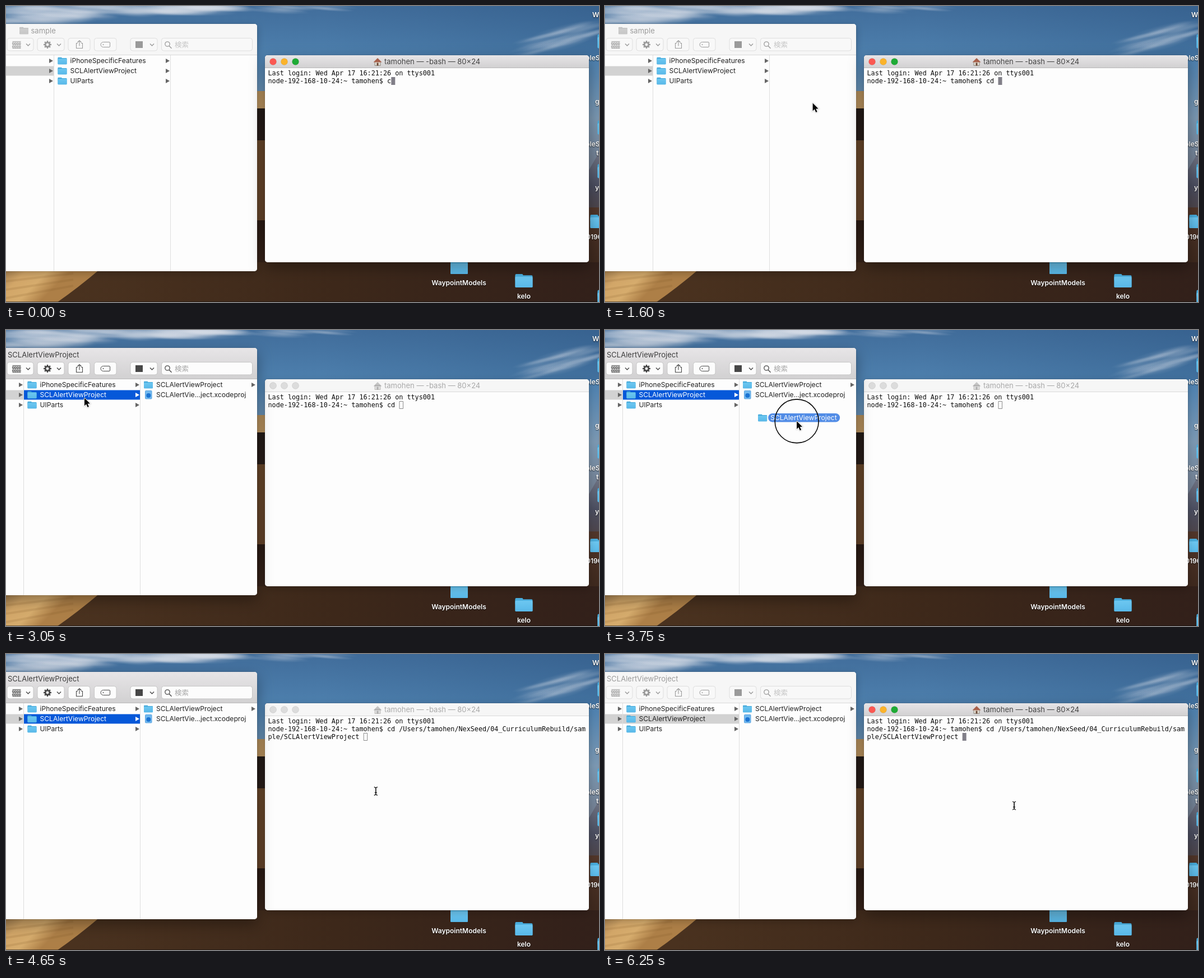
An HTML page with a canvas that plays this animation: 1058 by 529 pixels, repeating every 6.3 s.

```html
<!DOCTYPE html>
<html lang="ja">
<head>
<meta charset="utf-8">
<title>Drag a folder into the terminal</title>
<style>
html, body { margin: 0; width: 100%; height: 100%; overflow: hidden; background: #3a2519; }
canvas { display: block; width: 1058px; height: 529px; }
</style>
</head>
<body>
<canvas id="stage" width="1058" height="529"></canvas>
<script>
const W = 1058, H = 529, LOOP = 6300, STEP = 50;
const UI = 'Inter, "Noto Sans CJK JP", sans-serif';
const MONO = '"DejaVu Sans Mono", monospace';
const USER = 'tamohen';
const PROMPT = `node-192-168-10-24:~ ${USER}$ `;
const DROP = `/Users/${USER}/NexSeed/04_CurriculumRebuild/sample/SCLAlertViewProject `;
const PROJECT = 'SCLAlertViewProject';
const GREY = '#d2d2d2', BLUE = '#0658d9', INK = '#222';

const AT = { d: 150, space: 350, pointer: 1150, finder: 1700, open: 2300, slide: 2400, grab: 3300, drop: 4550, terminal: 5110 };
const PRESSES = [[AT.finder, AT.finder + 100], [AT.open, AT.open + 100], [AT.grab, AT.drop], [AT.terminal, AT.terminal + 100]];
const PATH = [
  { t: AT.pointer, x: 640, y: 250 },
  { t: 1950, x: 186, y: 121 },
  { t: 2700, x: 186, y: 121 },
  { t: 3330, x: 107, y: 122 },
  { t: 4100, x: 521, y: 194 },
  { t: 5000, x: 730, y: 271 },
];

const screen = document.getElementById('stage').getContext('2d');
let c = screen;

const clamp = v => Math.max(0, Math.min(1, v));
const ease = v => (v = clamp(v), v * v * (3 - 2 * v));
const mix = (a, b, k) => a + (b - a) * k;

function seeded(seed) {
  return () => (seed = seed * 16807 % 2147483647) / 2147483647;
}

function gradient(x0, y0, x1, y1, ...colors) {
  const g = c.createLinearGradient(x0, y0, x1, y1);
  colors.forEach((col, i) => g.addColorStop(i / (colors.length - 1), col));
  return g;
}

function text(s, x, y, size, color, font = UI, weight = 400) {
  c.font = `${weight} ${size}px ${font}`;
  c.fillStyle = color;
  c.fillText(s, x, y + size * 0.36);
}

function rect(x, y, w, h, fill) {
  c.fillStyle = fill;
  c.fillRect(x, y, w, h);
}

function paint(fill, stroke, width = 1) {
  if (fill) { c.fillStyle = fill; c.fill(); }
  if (stroke) { c.strokeStyle = stroke; c.lineWidth = width; c.stroke(); }
}

function box(x, y, w, h, r, fill, stroke) {
  c.beginPath();
  c.roundRect(x, y, w, h, r);
  paint(fill, stroke);
}

function disc(x, y, r, fill, stroke, width) {
  c.beginPath();
  c.arc(x, y, r, 0, Math.PI * 2);
  paint(fill, stroke, width);
}

function trace(pts) {
  c.beginPath();
  pts.forEach(([x, y]) => c.lineTo(x, y));
}

function poly(pts, fill) {
  trace(pts);
  paint(fill);
}

function line(pts, color, width) {
  trace(pts);
  paint(null, color, width);
}

function wisp(x, y, rx, ry, tilt, alpha) {
  c.save();
  c.translate(x, y);
  c.rotate(tilt);
  c.scale(rx, ry);
  const g = c.createRadialGradient(0, 0, 0, 0, 0, 1);
  g.addColorStop(0, `rgba(214,220,230,${alpha})`);
  g.addColorStop(1, 'rgba(214,220,230,0)');
  disc(0, 0, 1, g);
  c.restore();
}

function folder(x, y, w, grey) {
  const h = w * 0.78, l = x - w / 2, t = y - h / 2;
  const [back, top, base] = grey ? ['#c2c2c2', '#d0d0d0', '#c6c6c6'] : ['#48acdc', '#72cbf3', '#58b8e8'];
  box(l, t, w * 0.45, h * 0.5, w * 0.06, back);
  box(l, t + h * 0.1, w, h * 0.9, w * 0.06, back);
  box(l, t + h * 0.2, w, h * 0.8, w * 0.06, gradient(0, t, 0, t + h, top, base));
}

function sky() {
  rect(0, 0, W, 300, gradient(0, 0, 0, 300, '#416d9b', '#4f82b0', '#7b98b2', '#70798a'));
  rect(560, 0, W, 90, gradient(560, 0, W, 0, 'rgba(28,66,110,0)', 'rgba(28,66,110,.25)'));
  const rnd = seeded(41);
  for (let i = 0; i < 70; i++) {
    const x = rnd() * 390;
    wisp(x, rnd() * mix(30, 5, x / 390), 30 + rnd() * 60, 4 + rnd() * 6, 0.04, 0.36);
  }
  for (let i = 0; i < 12; i++) wisp(390 + rnd() * 190, rnd() * 10, 50, 4, 0.08, 0.2);
  for (let i = 0; i < 45; i++) {
    const k = rnd();
    wisp(mix(935, 1060, k), mix(70, 42, k) + (rnd() - 0.5) * 34, 25 + rnd() * 35, 4 + rnd() * 4, -0.25, 0.13);
  }
}

function dunes() {
  poly([[1036, 300], [1058, 262], [1058, 380], [1036, 380]], gradient(0, 268, 0, 375, '#6b7080', '#4a4d5f', '#4d4244'));
  // lit crest, its shade, the lit slope and the shade below it
  const bands = [[152, '#b08b59', '#c49d68'], [183, '#211916', '#2b1e19'], [240, '#644428', '#634329'], [383, '#281913', '#39251a']];
  for (const [y, top, base] of bands) rect(430, y, 40, 474 - y, gradient(0, y, 0, y + 100, top, base));

  rect(470, 360, W, H, gradient(0, 360, 0, H, '#513629', '#2f1e15'));
  rect(0, 458, W, H, gradient(120, 0, W, 0, '#4a321f', '#3d281a', '#32201a'));

  c.beginPath();
  c.moveTo(0, 470);
  c.lineTo(168, 470);
  c.quadraticCurveTo(128, 504, 92, H);
  c.lineTo(0, H);
  paint(gradient(0, 470, 60, H, '#a8814f', '#d2a668', '#d6ac6d', '#ad7f47'));
  for (let i = 0; i < 3; i++) line([[0, 492 + i * 15], [120, 478 + i * 11]], 'rgba(120,80,35,.15)', 4);
  rect(0, 528, W, 1, 'rgba(10,8,8,.5)');
}

function icons() {
  const label = (s, x, y) => text(s, x, y, 12, '#fff', UI, 600);
  folder(808.5, 467, 31);
  folder(924, 491, 31);
  [93, 247, 325, 550].forEach(y => folder(1071.5, y - 30, 32));
  folder(1058, 385, 31);
  c.shadowColor = 'rgba(0,0,0,.8)';
  c.shadowBlur = 2;
  c.shadowOffsetY = 1;
  c.textAlign = 'center';
  label('WaypointModels', 808, 495);
  label('kelo', 924, 519);
  c.textAlign = 'left';
  label('W', 1046, 16);
  label('pleS', 1034, 93);
  label('g', 1051, 171);
  label('pleS', 1034, 247);
  label('t', 1053, 263);
  label('y', 1051, 325);
  label('0190', 1035, 413);
}

function frame(x, y, w, h, bar, active) {
  c.save();
  c.shadowColor = `rgba(0,0,0,${active ? .34 : .22})`;
  c.shadowBlur = active ? 26 : 14;
  c.shadowOffsetY = active ? 9 : 4;
  box(x, y, w, h, 5, '#fdfdfd');
  c.restore();
  box(x, y, w, h, 5, null, 'rgba(0,0,0,.18)');
  box(x, y, w, h, 5, '#fdfdfd');
  box(x, y, w, bar, [5, 5, 0, 0], active ? gradient(0, y, 0, y + bar, '#e7e5e7', '#d1d0d1') : '#f6f6f6');
  rect(x, y + bar - 1, w, 1, active ? '#b9b8b9' : '#d9d9d9');
}

function chevron(x, y, dy, ink) {
  line([[x - 3.5, y - dy], [x, y], [x + 3.5, y - dy]], ink, 1.4);
}

function toolbar(active) {
  const ink = active ? '#474747' : '#9a9a9a';
  const [fill, edge] = active ? ['#fcfcfc', '#c6c6c6'] : ['#f8f8f8', '#dedede'];
  [[2, 47], [56, 48], [111, 39], [157.5, 39.5], [222, 48], [277.5, 162]]
    .forEach(([x, w]) => box(x, 57.5, w, 22.5, 4, fill, edge));
  [39.5, 94.5, 260.5].forEach(x => chevron(x, 71, 3.5, ink));

  for (let i = 0; i < 8; i++) box(11.5 + i % 4 * 4, i < 4 ? 65.5 : 71.5, 2.5, 2.5, 0, null, ink);
  for (let y = 63.5; y < 76; y += 6) line([[11.5, y], [26.5, y]], ink);

  for (let a = 0; a < Math.PI; a += Math.PI / 4) {
    const dx = Math.cos(a) * 7, dy = Math.sin(a) * 7;
    line([[74 - dx, 69 - dy], [74 + dx, 69 + dy]], ink, 2.4);
  }
  disc(74, 69, 3.8, fill, ink, 2.8);

  line([[128, 66.5], [125.5, 66.5], [125.5, 75.5], [136.5, 75.5], [136.5, 66.5], [134, 66.5]], ink, 1.1);
  line([[131, 71.5], [131, 62]], ink, 1.1);
  chevron(131, 62, -3, ink);

  box(169, 64.5, 16.5, 9, [4.5, 1.5, 1.5, 4.5], null, ink);
  disc(173.5, 69, 0.9, ink);
  box(231, 63, 13, 12, 0, ink);

  disc(288, 68, 4.2, null, ink, 1.3);
  line([[291, 71.2], [295.5, 75.7]], ink, 1.4);
  text('検索', 301, 69, 12.5, active ? '#a4a4a4' : '#c4c4c4');
}

function arrow(x, y, color = '#666') {
  poly([[x - 3, y - 4], [x + 4, y], [x - 3, y + 4]], color);
}

function entry(name, x, y, color = INK) {
  folder(x, y, 16);
  text(name, x + 14, y, 12.1, color);
}

function finder(t, active) {
  const open = t >= AT.open;
  const titleInk = active ? '#3d3d3d' : '#9c9c9c';
  frame(-40, 32, 488, 442, 56, active);
  if (open) text(PROJECT, 3, 44, 13, titleInk);
  else {
    folder(32, 44, 16, !active);
    text('sample', 44.5, 44, 13, titleInk);
  }
  toolbar(active);

  c.save();
  c.beginPath();
  c.roundRect(-40, 88, 488, 386, [0, 0, 5, 5]);
  c.clip();
  c.translate(-54 * ease((t - AT.slide) / 300), 0);
  rect(-60, 107.5, 145, 17, active && !open ? BLUE : GREY);
  if (open) rect(86, 107.5, 207, 17, active ? BLUE : GREY);
  for (const x of [85, 293]) rect(x, 88, 1, 386, '#dedede');
  ['iPhoneSpecificFeatures', PROJECT, 'UIParts'].forEach((name, i) => {
    const y = 98 + i * 18, chosen = active && i === 1;
    arrow(80, y, chosen && !open ? '#fff' : undefined);
    entry(name, 100.5, y, chosen && open ? '#fff' : INK);
    arrow(288, y, chosen && open ? '#fff' : undefined);
  });
  if (open) {
    entry(PROJECT, 308, 98);
    arrow(495, 98);
    box(302.5, 108.5, 11.5, 14.5, 1, '#72b9ef', '#5aa3df');
    disc(308.3, 117, 4, '#1c74d2');
    text('SCLAlertVie...ject.xcodeproj', 322, 116, 12.1, INK);
  }
  c.restore();
}

function house(active) {
  c.globalAlpha = active ? 1 : .45;
  box(658, 99, 10, 7.5, 0, active ? '#e3ddd2' : '#c0c0c0', '#8d8880');
  poly([[655.5, 100.5], [663, 93], [670.5, 100.5]], active ? '#a8604b' : '#888');
  rect(661.5, 101.5, 3, 5, active ? '#6d4b38' : '#777');
  c.globalAlpha = 1;
}

function terminal(t, active) {
  frame(462, 88, 578, 370, 23, active);
  ['#fb5852', '#fbb32a', '#1fab35'].forEach((col, i) =>
    disc(476.5 + i * 20, 99.5, 6, active ? col : '#dcdcdc', 'rgba(0,0,0,.1)', .8));
  house(active);
  text(`${USER} — -bash — 80×24`, 675, 99.5, 13, active ? '#434343' : '#a9a9a9');

  const cols = 80, cell = 7.09, left = 467.5;
  const print = (s, row) => text(s, left, 120 + row * 14, 11.78, '#0c0c0c', MONO);
  const typed = t < AT.d ? 'c' : t < AT.space ? 'cd' : 'cd ';
  const input = PROMPT + typed + (t >= AT.drop ? DROP : '');
  print('Last login: Wed Apr 17 16:21:26 on ttys001', 0);
  print(input.slice(0, cols), 1);
  print(input.slice(cols), 2);
  const x = left + input.length % cols * cell, y = 127 + Math.floor(input.length / cols) * 14;
  if (active) rect(x, y, 7, 14, '#817f88');
  else box(x + .5, y + .5, 6.5, 13, 0, null, '#8a8a8a');
}

function pointerAt(t) {
  const i = PATH.findIndex(p => p.t > t);
  if (i < 0) return PATH.at(-1);
  const a = PATH[i - 1], b = PATH[i], k = ease((t - a.t) / (b.t - a.t));
  return { x: mix(a.x, b.x, k), y: mix(a.y, b.y, k) };
}

function ghost(x, y) {
  box(x - 51, y - 14, 128, 15.5, 7.7, 'rgba(63,128,228,.9)');
  entry(PROJECT, x - 61, y - 6, '#fff');
}

function ring(t, x, y) {
  const press = PRESSES.find(([a, b]) => t >= a && t < b + 100);
  if (!press) return;
  const [down, up] = press;
  const r = 39 * clamp((Math.min(t, up) - down) / 200) * clamp(1 - (t - up) / 100);
  if (r > 1) disc(x, y, r, null, '#0b0b0b', 1.6);
}

function beam(x, y, color, width) {
  for (const s of [-3, 3]) line([[x + s, y - 7.5], [x, y - 6], [x, y + 6], [x + s, y + 7.5]], color, width);
  line([[x - 2, y + 2.5], [x + 2, y + 2.5]], color, width);
}

function arrowCursor(x, y) {
  c.save();
  c.translate(x, y);
  const shape = [[0, 0], [0, 14], [3.2, 11], [5.6, 16.5], [8, 15.5], [5.6, 10.2], [10, 10], [0, 0]];
  c.shadowColor = 'rgba(0,0,0,.35)';
  c.shadowBlur = 2;
  line(shape, '#fff', 2);
  c.shadowColor = 'transparent';
  poly(shape, '#050505');
  c.restore();
}

function plusBadge(x, y) {
  disc(x, y, 9.5, gradient(0, y - 9, 0, y + 9, '#2a9a1c', '#35b51f'), '#178010', .8);
  rect(x - 5, y - 1.2, 10, 2.4, '#fff');
  rect(x - 1.2, y - 5, 2.4, 10, '#fff');
}

function pointer(t) {
  if (t < AT.pointer) return;
  const { x, y } = pointerAt(t);
  const dragging = t >= AT.grab + 100 && t < AT.drop;
  const overTerminal = x > 462;
  if (dragging) ghost(x, y);
  ring(t, x, y);
  if (overTerminal && !dragging) {
    beam(x, y, 'rgba(255,255,255,.8)', 2.6);
    beam(x, y, '#111', 1.2);
  } else arrowCursor(x, y);
  if (overTerminal && dragging) plusBadge(x + 9, y + 22);
}

const wallpaper = document.createElement('canvas');
wallpaper.width = W;
wallpaper.height = H;
c = wallpaper.getContext('2d');
sky();
dunes();
icons();
c = screen;

function render(now) {
  const t = Math.floor(now % LOOP / STEP) * STEP;
  const finderFront = t >= AT.finder && t < AT.terminal;
  const windows = [() => finder(t, finderFront), () => terminal(t, !finderFront)];
  if (finderFront) windows.reverse();
  c.drawImage(wallpaper, 0, 0);
  windows.forEach(draw => draw());
  pointer(t);
}

let start;
function tick(now) {
  start ??= now;
  render(now - start);
  requestAnimationFrame(tick);
}
render(0);
requestAnimationFrame(tick);
</script>
</body>
</html>
```
